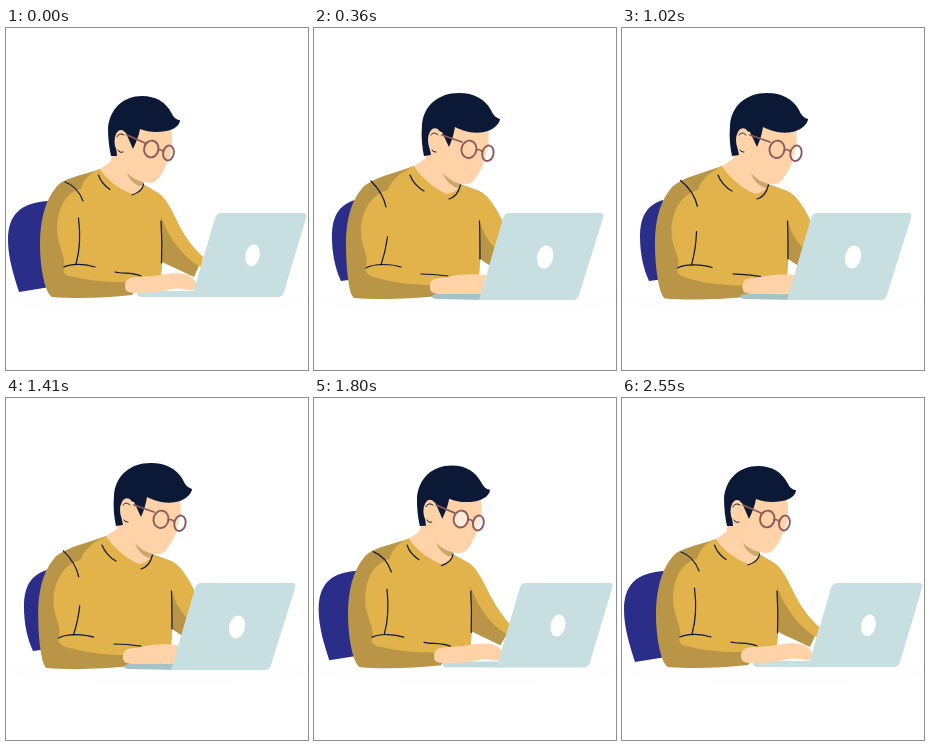
Animation, 302 px wide and 342 px high, one loop 2700 ms. Source, as an HTML page:

```html
<!DOCTYPE html>
<html lang="en">
<head>
<meta charset="utf-8">
<title>Man working at a laptop</title>
<style>
html, body { margin: 0; width: 100%; height: 100%; overflow: hidden; background: #fff; }
svg { display: block; width: 100vw; height: 100vh; }
</style>
</head>
<body>
<svg id="stage" viewBox="0 0 302 342"></svg>
<script>
const LOOP = 2700, STEP = 30;
const NAVY = '#0b1836', SKIN = '#ffd2a8', GOLD = '#e2b24b', OCHRE = '#b99647',
      BLUE = '#2a2e88', GLASS = '#c7dfe1', FRAME = '#8b5a5d';
const stage = document.getElementById('stage');
const parts = [];
const nums = s => s.match(/-?\d+(\.\d+)?/g).map(Number);

function add(style, side, front, reach = side) {
  const el = document.createElementNS('http://www.w3.org/2000/svg', 'path');
  for (const key in style) el.setAttribute(key, style[key]);
  stage.appendChild(el);
  const a = nums(side), r = nums(reach);
  parts.push({ el, form: side, a, b: nums(front), d: r.map((n, i) => n - a[i]) });
  return el;
}
const fill = color => ({ fill: color });
const line = (color, width) => ({
  fill: 'none', stroke: color, 'stroke-width': width,
  'stroke-linecap': 'round', 'stroke-linejoin': 'round'
});
const ink = line(NAVY, 1.2);

// Ellipse as two arcs
const oval = (x, y, rx, ry, tilt = 0) => {
  const q = tilt * Math.PI / 180, dx = ry * Math.sin(q), dy = ry * Math.cos(q);
  const p = n => n.toFixed(2);
  const arc = (ex, ey) => `A${rx} ${ry} ${tilt} 0 1 ${p(ex)} ${p(ey)}`;
  return `M${p(x + dx)} ${p(y - dy)} ${arc(x - dx, y + dy)} ${arc(x + dx, y - dy)} Z`;
};

// Each part: side view, front view and, for the arm, the side view with the arm drawn back.
const table = 'M0 264 L302 264 L302 277 C240 292 80 292 0 277 Z';
add(fill('#fefefe'), table, table);
add(fill(BLUE),
  'M13 264 C8 248 2 230 2 212 C2 188 13 174 44 173 L50 258 Z',
  'M27 253 C21 240 18 225 18 208 C18 190 24 177 41 172 L50 250 Z');

// Sweater
add(fill(OCHRE),
  'M94 141 C74 148 58 150 51 158 C38 173 34 195 34 216 C34 240 39 265 46 269 C70 271 100 270 126 267 L140 250 L155 247 L156 234 L188 249 L197 229 C188 221 181 212 175 201 C168 188 161 170 152 165 L137 156 Z',
  'M100 138 C78 146 62 149 52 158 C38 173 34 195 34 216 C34 242 40 268 46 271 C70 273 105 272 132 269 L146 252 L165 249 L166 231 L178 239 L200 225 C197 215 195 205 189 194 C184 184 176 168 165 163 L146 156 Z',
  'M94 141 C74 148 58 150 49 158 C36 173 32 195 32 216 C32 240 34 264 40 268 C64 270 92 269 117 266 L140 250 L155 247 L156 234 L188 249 L197 229 C188 221 181 212 175 201 C168 188 161 170 152 165 L137 156 Z');
add(fill(GOLD),
  'M94 141 C84 145 78 150 75 161 C59 164 51 182 51 201 C51 218 61 230 58 240 C56 246 61 248 69 249 C90 254 108 254 122 254 L155 247 L156 234 L155 188 C162 210 180 232 195 239 L197 229 C188 221 181 212 175 201 C168 188 161 170 152 165 L137 156 Z',
  'M100 138 C90 143 81 150 78 162 C61 166 52 184 52 203 C52 220 63 230 59 240 C57 246 62 249 70 251 C92 257 112 258 127 258 L165 249 L166 231 L165 190 C169 206 177 218 186 224 L200 225 C197 215 195 205 189 194 C184 184 176 168 165 163 L146 156 Z',
  'M94 141 C84 145 75 150 71 161 C55 164 46 182 46 201 C46 218 54 230 51 239 C49 245 54 247 62 248 C83 253 98 253 113 253 L155 247 L156 234 L155 188 C162 210 180 232 195 239 L197 229 C188 221 181 212 175 201 C168 188 161 170 152 165 L137 156 Z');

add(ink,
  'M59 154 C68 157 74 165 77 173', 'M60 152 C70 158 76 167 79 178', 'M56 155 C63 160 68 167 70 174');
add(ink,
  'M72.5 190 C74.5 206 74 222 70 236', 'M75.5 198 C76 211 75 224 72 237', 'M70.5 201 C71 212 69 226 65 236');
add(ink,
  'M58 239 C66 235 80 236 89 239', 'M59 240 C67 236 84 237 93 240', 'M51 239 C59 234 74 235 83 238');
add(ink,
  'M109 244 C117 246 126 244 135 248', 'M115 246 C123 247 134 247 143 249', 'M101 244 C109 245 118 244 126 247');
add(ink, 'M155 193 C156 208 156 222 155.5 235', 'M165.5 193 C166 206 166 219 166 231');

// Neck and head
add(fill(SKIN),
  'M108 122 L104 134 L94 141 C99 150 112 161 126 166 C134 164 137 160 138 154 L125 130 Z',
  'M114 122 L111 131 L100 138 C106 148 119 160 133 166 C142 164 146 160 147 155 L133 130 Z');
add(fill('#cda66b'),
  'M121 145 C126 150 132 153 138 154 C137 157 135 158 133 158 C127 155 123 151 121 145 Z',
  'M129 145 C134 151 141 155 148 156 C147 159 145 160 143 160 C136 157 131 152 129 145 Z');
add(ink, 'M92.5 147 C94 152 99 158 104 161.5', 'M96 147 C98 153 104 160 110 163');
add(ink, 'M137.5 156 C137 161 132 165 126 167', 'M146.5 157 C145 163 142 169 135 171');
add(fill(SKIN),
  'M112 108 L135 99 L165 98 C166 108 167 118 165 125 C161 135 157 146 152 151 C147 157 140 155 134 152 L120 143 L110 125 Z',
  'M118 108 L142 98 L174 98 C175 108 175 118 173 125 C170 137 165 146 160 152 C155 158 148 157 142 153 L128 143 L116 125 Z');
add(fill(NAVY),
  'M105 128 C103 119 102 110 102 100 C104 80 118 68 136 68 C150 68 160 74 166 86 C168 90 171 92 174 92 C174 97 168 102 160 103 C150 105 142 104 134 101 C133 108 130 114 127 121 L120 105 C113 103 109 108 110 117 L111 128 Z',
  'M110 128 C108 119 107 108 108 98 C109 78 124 65 145 65 C160 65 171 71 177 82 C179 87 182 90 186 91 C186 96 178 103 170 104 C158 106 150 103 141 99 C140 106 138 112 135 119 L128 104 C119 101 114 107 115 117 L117 127 Z');
add(fill(SKIN), oval(115, 113.5, 6.5, 11.5), oval(121, 112, 7, 11.8));
add(line(NAVY, 1),
  'M111 109 C112 106 115 105 118 107 M112 122 C113 124 115 125 117 124',
  'M117 107 C119 104 122 105 124 107 M118 122 C119 124 121 124 122 124');

// Glasses
const lens = { ...line(FRAME, 1.9), fill: '#fff' };
add(line(FRAME, 1.8), 'M121 107 L139 115', 'M128 107 L148 114');
const lenses = [
  add(lens, oval(145.3, 121, 7.2, 8.4, 12), oval(155, 121.3, 7.5, 8.7, 12)),
  add(lens, oval(162.5, 125, 5.3, 7.5, 12), oval(174, 125.3, 5.6, 7.8, 12))
];
add(line(FRAME, 1.6), 'M152 122 C154 121 156 122 157 124', 'M162 122 C164 121 167 122 168.5 124');

// Laptop base, hand, screen
const base = add(fill(GLASS),
  'M131 266 C131 264 133 263 136 263 L192 263 L192 269 L136 269 C133 269 131 268 131 266 Z',
  'M118 269 C118 267 120 266 124 266 L170 266 L170 272 L124 271 C120 271 118 270 118 269 Z');
add(fill(SKIN),
  'M119 258 C119 251 124 249 132 249 L148 248 C158 246 170 244 179 246 C188 249 193 256 190 262 C180 263 176 259 166 261 C154 264 142 265 130 265 C122 265 119 263 119 258 Z',
  'M125 259 C125 252 129 250 137 250 L151 248 C160 247 167 246 176 247 C184 250 186 257 184 263 C178 266 172 265 166 265 C156 266 146 266 136 266 C128 266 125 264 125 259 Z',
  'M110 258 C110 251 115 249 123 249 L140 247 C152 245 165 244 174 246 C182 249 189 256 187 262 C178 264 170 260 160 262 C148 264 133 265 121 265 C113 265 110 263 110 258 Z');
add(fill(GLASS),
  'M186 269 L209 190 C210 187 212 185 215 185 L297 185 C300 185 301 187 300 190 L278 264 C277 267 275 269 271 269 Z',
  'M165 272 L189 190 C190 187 192 185 195 185 L286 185 C289 185 290 187 289 190 L265 267 C264 270 262 272 258 272 Z');
add(fill('#fff'), oval(246.5, 227.3, 7.2, 11, 12), oval(231, 229, 8, 11.6, 12));

const clamp = x => Math.min(1, Math.max(0, x));
const smooth = x => x * x * (3 - 2 * x);
const span = (t, from, to) => clamp((t - from) / (to - from));
const ramp = (t, from, to) => smooth(span(t, from, to));

// 0 = side view, 1 = front view
function turn(t) {
  const out = 1 - (1 - span(t, 0, 450)) ** 2;
  const back = span(t, 1350, 1890) ** 1.63;
  return smooth(out) - smooth(back);
}

// 0 = arm forward, 1 = arm drawn back
function pull(t) {
  return ramp(t, 0, 150) - ramp(t, 600, 750)
       + ramp(t, 900, 1140) - ramp(t, 1380, 1530)
       + ramp(t, 1890, 2040) - ramp(t, 2400, 2550);
}

function draw(t) {
  const v = turn(t), p = pull(t);
  for (const { el, form, a, b, d } of parts) {
    let i = 0;
    el.setAttribute('d', form.replace(/-?\d+(\.\d+)?/g, () => {
      const n = a[i] + (b[i] - a[i]) * v + d[i] * p;
      i++;
      return +n.toFixed(2);
    }));
  }
  const shade = [199, 223, 225].map((c, i) => Math.round(c - v * [34, 28, 26][i]));
  base.setAttribute('fill', `rgb(${shade})`);

  // The lenses catch the light while the view turns
  const glint = 4 * v * (1 - v);
  lenses[0].setAttribute('fill-opacity', glint);
  lenses[1].setAttribute('fill-opacity', Math.max(glint, 0.35 * v));
}

const start = performance.now();
function tick() {
  const t = (performance.now() - start) % LOOP;
  draw(Math.floor(t / STEP) * STEP);
  requestAnimationFrame(tick);
}
draw(0);
requestAnimationFrame(tick);
</script>
</body>
</html>
```
